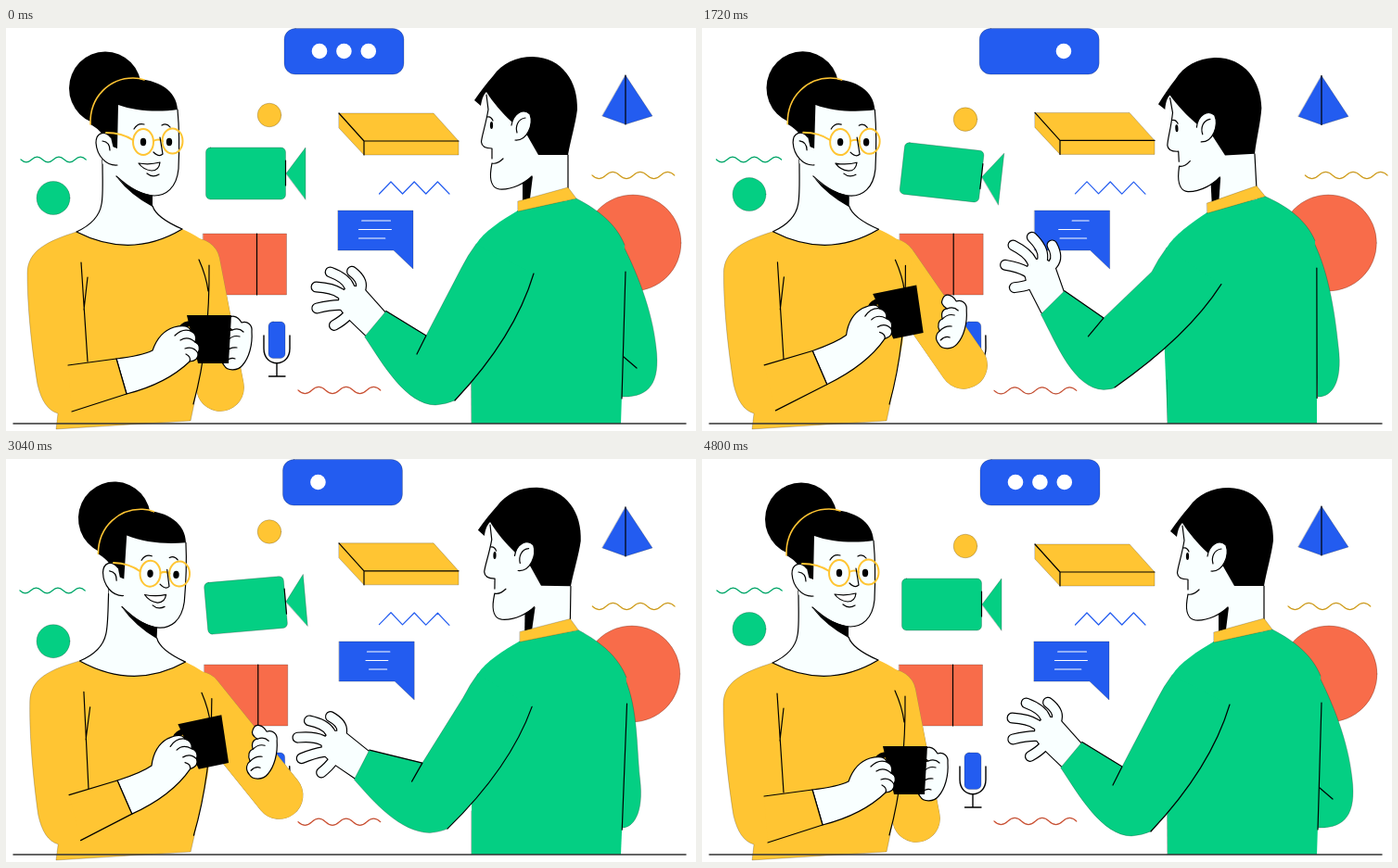
Write an HTML page with a canvas that moves like this. It is 744 by 435 pixels and loops after 4.84 s.

```html
<!DOCTYPE html>
<html lang="en">
<head>
<meta charset="utf-8">
<title>Conversation</title>
<style>
html, body { margin: 0; width: 100%; height: 100%; overflow: hidden; background: #fff; }
canvas { display: block; }
</style>
</head>
<body>
<canvas id="stage" width="744" height="435"></canvas>
<script>
const c = document.getElementById('stage').getContext('2d');
const BLUE = '#235cf0', GREEN = '#04cf83', YELLOW = '#ffc533', RED = '#f86c4a', SKIN = '#f9ffff', BLACK = '#000';
const EDGE = 'rgba(0,0,0,.35)';
const LOOP = 4840, SPAN = 4800;
const KEYS = [0, 640, 1240, 2200, 3040, 4120];
const RAD = Math.PI / 180;
let now = 0;

// Smooth periodic curve through the acting keys.
function ease(...v) {
  const n = KEYS.length;
  const key = i => {
    const turn = Math.floor(i / n), j = i - turn * n;
    return [KEYS[j] + turn * SPAN, v[j]];
  };
  const rise = i => {
    const [a, p] = key(i), [b, q] = key(i + 1);
    return (q - p) / (b - a);
  };
  const slope = i => {
    const a = rise(i - 1), b = rise(i);
    return a * b <= 0 ? 0 : 2 * a * b / (a + b);
  };
  let i = n - 1;
  while (KEYS[i] > now % SPAN) i--;
  const [a, p] = key(i), [b, q] = key(i + 1), d = b - a, s = (now % SPAN - a) / d;
  const s2 = s * s, s3 = s2 * s;
  return p * (2 * s3 - 3 * s2 + 1) + slope(i) * d * (s3 - 2 * s2 + s)
    + q * (3 * s2 - 2 * s3) + slope(i + 1) * d * (s3 - s2);
}
function wave(cycles, mid, cos, sin, cos2) {
  const a = now / SPAN * 2 * Math.PI * cycles;
  return mid + cos * Math.cos(a) + sin * Math.sin(a) + cos2 * Math.cos(2 * a);
}
const swing = (mid, size, peak) => mid + size * Math.cos(now / SPAN * 2 * Math.PI - peak * RAD);

const mix = (a, b, k) => [a[0] + (b[0] - a[0]) * k, a[1] + (b[1] - a[1]) * k];
const off = (p, x, y) => [p[0] + x, p[1] + y];
const show = p => p[0].toFixed(2) + ' ' + p[1].toFixed(2);
const path = (s, ...pts) => s.reduce((d, part, i) => d + part + (i < pts.length ? show(pts[i]) : ''), '');
const warp = (d, f) => d.replace(/(-?[\d.]+) (-?[\d.]+)/g, (m, x, y) => show(f(+x, +y)));
const frameAt = (p, deg) => (x, y) => {
  const s = Math.sin(deg * RAD), k = Math.cos(deg * RAD);
  return [p[0] + x * k - y * s, p[1] + x * s + y * k];
};

function ink(d, fill, line, width = 1.2) {
  const p = new Path2D(d);
  if (fill) { c.fillStyle = fill; c.fill(p); }
  if (line) { c.strokeStyle = line; c.lineWidth = width; c.stroke(p); }
}
const shape = (d, fill) => ink(d, fill, EDGE, .6);
const line = (d, color = BLACK, w = 1.2) => ink(d, null, color, w);
function oval(x, y, rx, ry, fill, stroke, w) {
  const p = new Path2D();
  p.ellipse(x, y, rx, ry, 0, 0, 7);
  ink(p, fill, stroke, w);
}
function box(x, y, w, h, r, fill) {
  const p = new Path2D();
  p.roundRect(x, y, w, h, r);
  shape(p, fill);
}
function turned(x, y, deg, dx, draw) {
  c.save();
  c.translate(x + dx, y);
  c.rotate(deg * RAD);
  c.translate(-x, -y);
  draw();
  c.restore();
}
function moved(x, y, draw) {
  c.save();
  c.translate(x, y);
  draw();
  c.restore();
}
function squiggle(x, y, half, color) {
  const d = `M${x} ${y}q${half / 2} ${half * .48} ${half} 0` + `t${half} 0`.repeat(5);
  line(d, color);
  line(d, EDGE, .8);
}

function scenery() {
  const sway = wave(1, 4.5, 8.5, -1.5, -13);
  const bob = wave(2, -6, 8, -10.7, -2);

  const px = 300 - 1.2 * sway;
  box(px, .5, 129, 49.5, 12, BLUE);
  for (let i = 0; i < 3; i++) {
    const hidden = now >= 960 + 640 * i && now < 2880 + 480 * i;
    if (!hidden) oval(px + 38 + 26.4 * i, 25, 8.3, 8.3, '#fff');
  }

  oval(284, 94 + bob, 12.8, 12.8, YELLOW, EDGE, .6);
  oval(51, 183.5 - .85 * bob, 18, 18, GREEN, EDGE, .6);
  oval(676 - .9 * sway, 232, 52, 52, RED, EDGE, .6);

  squiggle(16 - .8 * sway, 142, 11.7, GREEN);
  squiggle(632 + wave(1, 5.5, -5.5, 12, 0), 159, 14.8, YELLOW);
  squiggle(315, 391 + .55 * sway, 14.8, RED);

  moved(0, -.9 * sway, () => {
    shape('M359 92L461 92L488 122V137H386L359 108Z', YELLOW);
    line('M359 92L386 122H488M386 122V137');
  });
  moved(0, .75 * sway, () => {
    shape('M668 51L697 95L668 104L643 95Z', BLUE);
    line('M668 51V104');
  });
  turned(269, 157, wave(2, -.75, 2.8, -6, -2.05), 0, () => {
    shape('M302 157L323 129V185Z', GREEN);
    box(215.5, 129, 86, 56, 5, GREEN);
    line('M301.5 143V170');
  });
  turned(440, 172.5, sway * .45, 0, () =>
    line('M402.5 179l12.5 -13' + 'l12.6 13l12.6 -13'.repeat(2) + 'l12.6 13', BLUE));

  moved(212.5 + sway, 222, () => {
    shape('M0 0H90V66H0Z', RED);
    line('M58 0V66');
  });

  moved(358 + .95 * sway, 197, () => {
    shape('M0 0H81V63L60 43H0Z', BLUE);
    const row = (y, from, to) => line(`M${from} ${y}H${to}`, '#fff');
    row(11, swing(31.5, 9, 130), swing(56.5, 2.5, 90));
    row(20.5, swing(25.5, 3.5, 210), swing(53.5, 4.5, 330));
    row(30, swing(27, 5.5, 215), swing(52.5, 3.5, 120));
  });

  turned(292, 346, sway * -.75, 0, () => {
    box(283, 317, 18, 39.5, 5, BLUE);
    line('M278 332V346C278 367 306 367 306 346V332M292 362V376M283.5 376H301', BLACK, 1.4);
  });
}

// Fingers fan out from the cuff; the wrist opens as the arm goes up.
function manHand(cuff, angle, c1, c2, raise) {
  const ray = (deg, len) => {
    const a = (180 + angle + deg) * RAD;
    return off(cuff, Math.cos(a) * len, Math.sin(a) * len);
  };
  const wrist = 22 * raise;
  const palm = ray(6 + wrist * .6, 28);
  const fingers = [];
  for (let i = 0; i < 5; i++) {
    const deg = 26 - 17 * i + wrist;
    const len = 76 - 5.5 * (i - 1.6) ** 2;
    fingers.push([ray(deg + 8, len * .8), ray(deg, len)]);
  }
  const rim = [mix(c1, c2, .18), ...fingers.map(f => mix(palm, f[0], .55)), mix(c1, c2, .82)];
  const d = 'M' + rim.map(show).join('L') + 'Z';
  line(d, BLACK, 11.2);
  for (const [mid, tip] of fingers.reverse()) {
    const f = path`M${palm}L${mix(palm, mid, .7)}Q${mid} ${tip}`;
    line(f, BLACK, 12);
    line(f, SKIN, 9.6);
  }
  ink(d, SKIN, SKIN, 9);
}

function manArm(start, raise, out) {
  const inner = mix([453, 332], [429, 309], raise);
  const low = mix([463, 407], [427, 387], raise);
  const under = mix([484, 402], [437, 385], raise);
  const top = mix([569, 265], [558, 279], raise);
  const crease = off(inner, -10 - 8 * raise, 20);
  const angle = 40 + 20 * raise - 19 * out;
  const forearm = frameAt(mix(inner, low, .5), angle);
  const cuff = forearm(-78, 0), c1 = forearm(-78, -18), c2 = forearm(-78, 18);
  const belly = off(mix(top, under, .5), 22, 0);

  manHand(cuff, angle, c1, c2, raise);
  const arm = path`M${start}Q${off(start, -9, 12)} ${off(start, -16, 26)}L${inner}L${c1}L${c2}`
    + path`C${off(mix(c2, low, .33), -5, 6)} ${off(low, -32, -1)} ${low}Q${off(low, 12, -1)} ${under}`;
  ink(arm + path`Q${belly} ${top}Z`, GREEN);
  line(arm, EDGE, .6);
  line(path`M${c1}L${inner}L${crease}M${under}Q${belly} ${top}`);
}

function man(reach) {
  const raise = ease(0, .45, 1, .55, .17, 0);
  const out = reach * reach;
  const lean = 5 * out - 12.3 * raise;
  const body = (x, y) => {
    const h = (427 - y) / 230;
    return [x + lean * h, y + (x - 583) * lean * .009 * h];
  };

  const o = 701 - 19 * reach;
  shape(path`M${body(662, 228)}C${body(680, 262)} ${[o - 4, 305]} ${[o, 345]}C${[o + 5, 385]} ${[o - 9, 399]} ${[664, 398]}Z`, GREEN);
  ink(warp('M552 197C535 207 515 220 507 233L501 300L502 427L663 427L667 300L667 234C658 212 640 197 615 184Z', body), GREEN);
  line(warp('M615 184C640 197 658 212 667 234', body) + 'M501.5 380V427', EDGE, .6);
  line(warp('M668 263L664 400', body));
  const fold = 14 - 18 * reach;
  if (fold > 1) line(`M666 355l${fold} ${fold * .86}`);

  turned(583, 190, .42 * lean, lean, () => {
    ink('M518 68L516 105L513 122C512 128 518 130 524 130L524 142C522 152 521 166 527 172C540 177 550 171 557 167L556 193L606 186V120L560 80Z', SKIN);
    ink('M557 167L568 160L565 184L557 186Z', BLACK);
    line('M518 72L520 88C517 106 513 116 512.5 123C513 129 519 130 524 130V141M536 141C532 145 528 147 524 146L523 152C521 166 525 173 532 174C546 175 560 167 567 160M606 137V180');
    ink('M505 78C512 68 518 60 525 52C535 38 550 31 568 31C600 32 617 58 616 88C614 104 609 120 606 137L574 137L562 116L545 101C535 92 525 80 518 69C514 73 513 78 512 84Z', BLACK);
    ink('M545 105C547 92 558 86 565 93C569 104 562 122 549 121', SKIN, BLACK);
    line('M560 97C552 98 549 106 551 113M519 96Q523 95 525 100');
    oval(523.5, 105, 1.6, 4, BLACK);
  });
  shape(warp('M552 187L606 172L615 184L552 198Z', body), YELLOW);
  manArm(body(507, 233), raise, out);
}

function woman(reach) {
  const lean = ease(0, -5, -11.5, 12.5, 3.5, -2.5);
  const lift = ease(0, .32, .75, 1, .95, .1);
  const tilt = .75 * lean - .02 * lean * Math.max(lean, 0);
  const body = (x, y) => {
    const h = (430 - y) / 212;
    return [x + lean * h, y + (x - 133) * lean * .0105 * h];
  };
  const turn = frameAt([133 + lean, 220], tilt);
  const head = (x, y) => turn(x - 133, y - 220);

  // far arm
  const elbow = mix(mix([231, 388], [255, 362], reach), mix([255, 362], [302, 363], reach), reach);
  const sleeve = path`M${body(205, 253)}L${elbow}`;
  line(sleeve, '#a98b45', 51.6);
  line(sleeve, YELLOW, 51);

  const torso = warp('M190 217Q135 250 76 220C45 230 23 240 23 265C23 310 30 360 34 385C38 402 45 413 56 416L54 433L199 424L203 405', body);
  ink(torso + warp('L216 340L226 243C217 230 203 223 190 217Z', body), YELLOW);
  line(torso, EDGE, .6);
  line(warp('M81 253L88 360M88 269L84 304M208 250Q216 268 218 284M219 256Q220 340 202 406', body));

  // neck
  const neck = path`M${head(104, 142)}C${head(104, 165)} ${head(105, 180)} ${head(103, 190)}Q${body(100, 209)} ${body(76, 220)}`
    + path`Q${body(135, 250)} ${body(190, 217)}Q${body(162, 205)} ${head(158, 192)}`;
  ink(neck + path`L${head(158, 170)}L${head(125, 110)}Z`, SKIN);
  line(neck);
  turned(133, 220, tilt, lean, womanHead);

  // far hand, then mug and near hand in one frame
  const mug = [195 - 12 * lift + .5 * lean, 310 - 25 * lift];
  const hold = frameAt(mug, -12.5 * lift);
  moved(mug[0] + 53 + 40 * reach, mug[1] + 30, () => {
    ink('M-9 -24C-6 -32 2 -29 6 -22C12 -24 18 -20 17 -12C18 2 14 16 7 24C2 30 -9 31 -13 24C-18 18 -15 12 -12 10C-15 4 -13 -2 -9 -3C-11 -10 -8 -14 -4 -14C-9 -17 -11 -20 -9 -24Z', SKIN, BLACK);
    line('M-12 10Q-6 4 1 5M-9 -3Q-3 -9 4 -7M-4 -14Q3 -17 8 -12M-11 20Q-6 15 -1 17');
  });
  ink(warp('M0 0L48 0L45 52L12 52Z', hold), BLACK);
  line(warp('M5 9C-5 9 -10 17 -7 26', hold), BLACK, 6);

  // near forearm
  const c1 = [119 + .3 * lean, 357 - 9 * lift - .4 * lean];
  const c2 = off(c1, 11 + 5 * lift, 38 - 2 * lift);
  const wrist = hold(-37, 38);
  ink(path`M${c1}Q${off(mix(c1, wrist, .7), 0, 3)} ${wrist}`
    + warp('Q-30 18 -14 13Q2 9 4 17Q12 21 9 29Q16 33 12 41Q13 49 3 50', hold)
    + path`Q${hold(-22, 74)} ${c2}Z`, SKIN, BLACK);
  line(warp('M4 17Q-5 14 -13 22M9 29Q1 22 -7 27M12 41Q7 33 -2 36M3 50Q5 45 -1 42', hold));
  const cuff = path`M${off(c1, -52, 7 + 9 * lift)}L${c1}L${c2}L${off(c1, 9 * lift - 48, 57 + 8 * lift)}`;
  ink(cuff, YELLOW, BLACK);
}

function womanHead() {
  oval(107, 65, 39, 39.5, BLACK);
  ink('M119 82L185 86C187 110 187 130 186 152C184 173 172 181 160 181C146 181 130 170 118 160L104 146L104 120Z', SKIN);
  ink('M120 162Q136 176 158 181V193Q134 180 120 162Z', BLACK);
  line('M185 88C187 110 187 130 186 152C184 173 172 181 160 181C146 181 130 170 119 160');
  ink('M91 104C92 75 112 55 137 55C165 55 184 68 185 88C165 91 140 90 121 83L120 130L112 127C104 112 98 108 91 104Z', BLACK);
  line('M91 104C90 73 113 54 137 54Q144 54 149 56', YELLOW, 1.6);
  const ear = 'M113 118C106 110 97 113 97 124C98 138 108 149 120 148';
  ink(ear, SKIN);
  line(ear + 'M104 122Q112 123 112 132');
  line('M108 113Q125 113 137 121M159 122Q164 119 169 122', YELLOW, 2);
  oval(148, 123, 11, 14, null, YELLOW, 2);
  oval(179.5, 122, 11, 13.5, null, YELLOW, 2);
  oval(148, 123, 3.2, 4.2, BLACK);
  oval(176, 123, 3.2, 4.2, BLACK);
  line('M138 109Q142 102 149 104M168 105Q173 102 177 107M166 118L169 136Q165 140 159 134M152 157Q158 162 165 158');
  ink('M143 146Q155 148 166 145Q165 154 157 154Q148 153 143 146Z', '#fff', BLACK);
}

const start = performance.now();
function tick() {
  now = Math.min(Math.floor((performance.now() - start) % LOOP / 40) * 40, SPAN);
  c.lineCap = c.lineJoin = 'round';
  c.fillStyle = '#fff';
  c.fillRect(0, 0, 744, 435);
  const reach = ease(0, .12, .42, 1, .92, .22);
  scenery();
  woman(reach);
  man(reach);
  line('M8 427H733', '#333', 1.5);
  requestAnimationFrame(tick);
}
tick();
</script>
</body>
</html>
```
